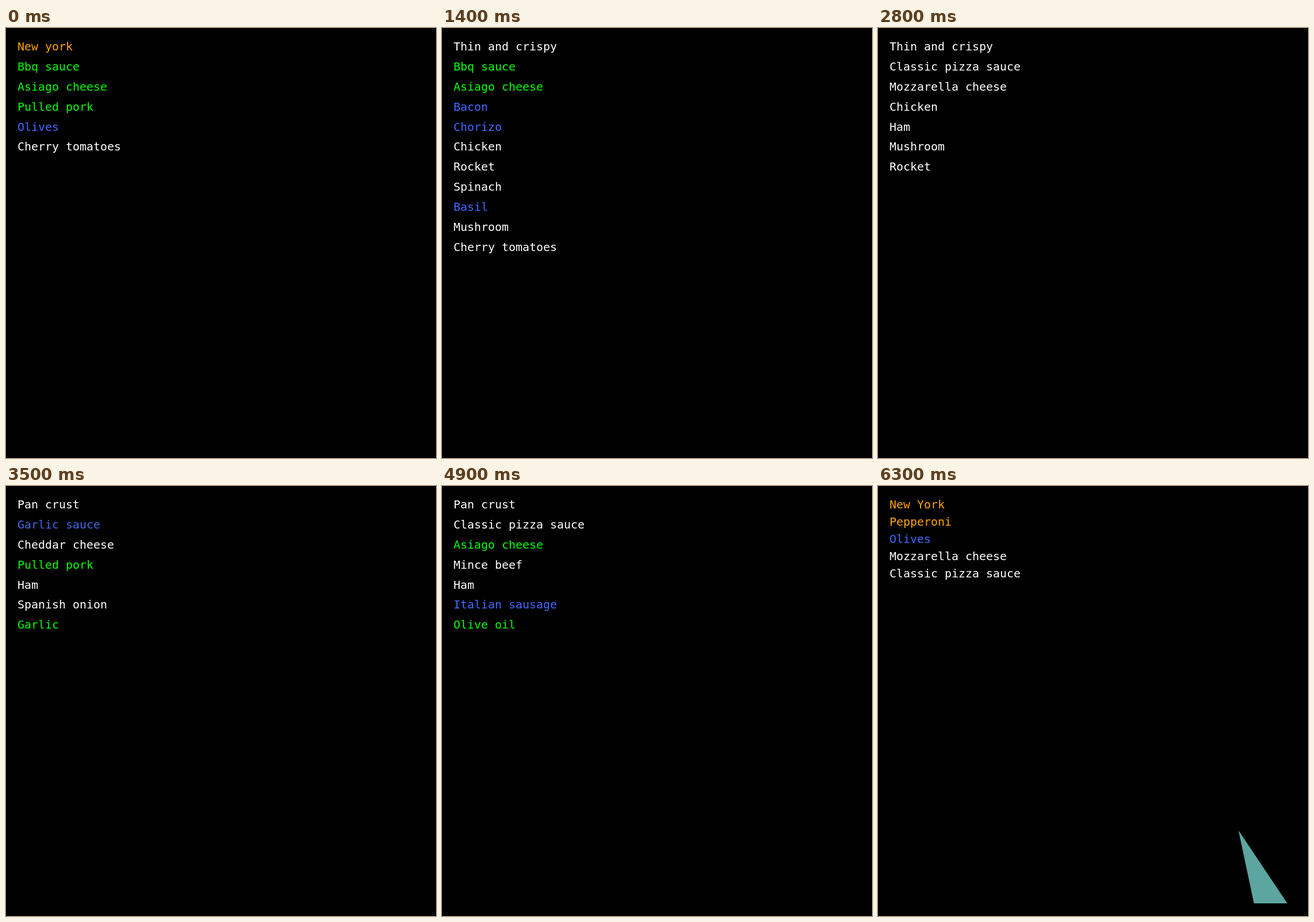
Write an HTML page that moves like this. It is 748 px wide and 748 px high and loops after 7 s.

```html
<!DOCTYPE html>
<html lang="en">
<head>
<meta charset="utf-8">
<title>Pizza toppings</title>
<style>
  html, body { margin: 0; width: 100%; height: 100%; overflow: hidden; background: #000; }
  svg { display: block; width: 100%; height: 100%; }
  text { font: 20px "DejaVu Sans Mono", monospace; white-space: pre; }
</style>
</head>
<body>
<svg viewBox="0 0 748 748">
  <defs>
    <linearGradient id="leaf" x1="0" y1="0" x2="1" y2="1">
      <stop offset="0" stop-color="#479016"/>
      <stop offset=".45" stop-color="#76c51d"/>
      <stop offset="1" stop-color="#4c9a10"/>
    </linearGradient>
    <linearGradient id="stem">
      <stop offset="0" stop-color="#438a10"/>
      <stop offset=".5" stop-color="#8ada2a"/>
      <stop offset="1" stop-color="#4b9712"/>
    </linearGradient>
    <linearGradient id="gold">
      <stop offset="0" stop-color="#b88b1c"/>
      <stop offset=".25" stop-color="#d8ae2c"/>
      <stop offset=".5" stop-color="#f2cf3c"/>
      <stop offset=".75" stop-color="#dcb02e"/>
      <stop offset="1" stop-color="#b88a1e"/>
    </linearGradient>
    <linearGradient id="back">
      <stop offset="0" stop-color="#c09a22"/>
      <stop offset="1" stop-color="#8c6420"/>
    </linearGradient>
    <radialGradient id="teal" cx=".4" cy=".35">
      <stop offset="0" stop-color="#35c79c"/>
      <stop offset="1" stop-color="#109068"/>
    </radialGradient>
    <radialGradient id="pink" cx=".4" cy=".35">
      <stop offset="0" stop-color="#ee70ca"/>
      <stop offset="1" stop-color="#bf379c"/>
    </radialGradient>
  </defs>

  <g id="list" transform="scale(.997333)"></g>

  <g id="sprout" fill="none" stroke-linecap="round">
    <path fill="url(#stem)" d="M669 653C677 672 677 700 670 721Q673 727 679 723C685 702 684 676 676 655Z"/>
    <path fill="url(#leaf)" d="M674 658C672 640 674 622 689 615C702 609 717 611 729 611C723 617 725 626 720 635C711 650 688 645 674 658Z"/>
    <path fill="url(#leaf)" d="M672 660C662 649 645 642 627 647C611 653 610 673 603 687C608 681 614 684 625 682C645 680 652 664 672 660Z"/>
    <path stroke="#9ccb70" stroke-width="1.4" d="M675 657Q692 630 725 613M671 659Q638 650 606 682"/>
    <path stroke="#8cc650" stroke-width=".7" d="M684 643L683 626M693 633L694 619M704 625L708 614M685 643L702 641M695 632L714 632M706 624L721 622M654 655L643 647M641 656L628 649M628 662L616 657M653 656L645 667M639 657L631 673M626 664L620 679"/>
  </g>

  <g id="crown">
    <path fill="url(#back)" d="M617 670Q635 662 640 635H647Q651 655 667 664Q681 655 685 635H692Q697 662 715 670L705 692H627Z"/>
    <circle cx="643.5" cy="629" r="8" fill="#c59d22"/>
    <circle cx="689" cy="629" r="8" fill="#b18a28"/>
    <ellipse cx="611.5" cy="645" rx="5.2" ry="9" fill="#cda11e"/>
    <ellipse cx="721" cy="645" rx="5.2" ry="9" fill="#c69a25"/>
    <path fill="url(#gold)" d="M611 651Q618 684 632 685Q654 682 663 650H671Q680 682 700 685Q715 684 721 651L726 711C718 730 617 730 609 711Z"/>
    <path fill="none" stroke="#f0d460" stroke-width="1.2" d="M612 653Q618 684 632 685Q654 682 663 651M671 651Q680 682 700 685Q715 684 720 653"/>
    <path fill="none" stroke="#8d6817" stroke-width="1.2" d="M609 706C619 721 716 721 726 706"/>
    <path fill="none" stroke="#f0cd48" stroke-width="1.5" d="M610 709C620 724 715 724 725 709"/>
    <circle cx="667" cy="642" r="10.2" fill="#f1d033"/>
    <g stroke="#a67c18" stroke-width=".8">
      <ellipse cx="611" cy="688" rx="4.7" ry="11" fill="url(#teal)"/>
      <ellipse cx="721" cy="688" rx="4.7" ry="11" fill="url(#teal)"/>
      <ellipse cx="666" cy="700" rx="11" ry="12" fill="url(#teal)"/>
      <ellipse cx="630" cy="698" rx="6" ry="7" fill="url(#pink)"/>
      <ellipse cx="702" cy="698" rx="6" ry="7" fill="url(#pink)"/>
    </g>
  </g>

  <path id="wedge" fill="#5da5a0" d="M627 599L654 726H712Z"/>
</svg>
<script>
const HOLD = 700;
const COLORS = { w: '#fff', o: '#ffa500', g: '#0f0', b: '#4169ff', r: '#4169e1' };
const ICONS = ['sprout', 'crown', 'wedge'];

// Each line starts with its colour key.
const slide = (lines, icon) => ({ lines: lines.split('|'), icon, pitch: icon ? 30 : 35 });
const slides = [
  slide('oNew york|gBbq sauce|gAsiago cheese|gPulled pork|bOlives|wCherry tomatoes'),
  slide('wPan crust|bGarlic sauce|wCheddar cheese|bBacon|wHam|wChicken|wMushroom|wBell peppers'),
  slide('wThin and crispy|gBbq sauce|gAsiago cheese|bBacon|bChorizo|wChicken|wRocket|wSpinach|bBasil|wMushroom|wCherry tomatoes'),
  slide('wThin and crispy|wOnion|wSpanish onion|wBell peppers|wMushroom|wRocket|wSpinach|wTomatoes|oParmigiano-reggiano cheese|wClassic pizza sauce', 'sprout'),
  slide('wThin and crispy|wClassic pizza sauce|wMozzarella cheese|wChicken|wHam|wMushroom|wRocket'),
  slide('wPan crust|rGarlic sauce|wCheddar cheese|gPulled pork|wHam|wSpanish onion|gGarlic'),
  slide('oChicago deep dish|oPepperoni|wMince beef|bOlives|wBell peppers|wMushroom|wMozzarella cheese|wClassic pizza sauce', 'crown'),
  slide('wPan crust|wClassic pizza sauce|gAsiago cheese|wMince beef|wHam|bItalian sausage|gOlive oil'),
  slide('wPan crust|wClassic pizza sauce|wMozzarella cheese|wMince beef|wChicken|wMushroom|wCherry tomatoes'),
  slide('oNew York|oPepperoni|bOlives|wMozzarella cheese|wClassic pizza sauce', 'wedge')
];

const list = document.getElementById('list');
let shown = -1;

function draw(index) {
  const { lines, icon, pitch } = slides[index];
  list.innerHTML = lines.map((line, i) =>
    `<text x="20" y="${39 + i * pitch}" fill="${COLORS[line[0]]}">${line.slice(1)}</text>`).join('');
  for (const id of ICONS) {
    document.getElementById(id).style.display = id === icon ? '' : 'none';
  }
  shown = index;
}

const start = performance.now();
function tick() {
  const index = Math.floor((performance.now() - start) / HOLD) % slides.length;
  if (index !== shown) draw(index);
  requestAnimationFrame(tick);
}
tick();
</script>
</body>
</html>
```
